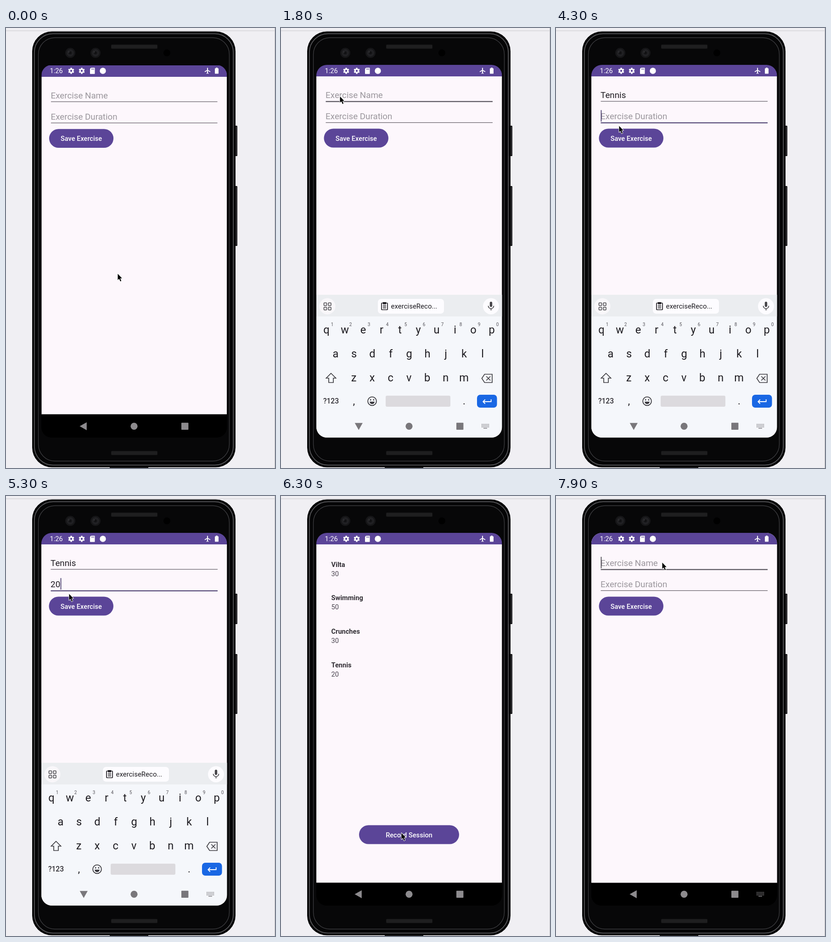
An HTML page with a canvas for the animation above (8 s loop, 586x955 px).

```html
<!DOCTYPE html>
<html lang="en">
<head>
<meta charset="utf-8">
<title>Exercise form</title>
<style>
html, body { margin: 0; width: 100%; height: 100%; overflow: hidden; background: #f0eff3; }
canvas { display: block; width: 586px; height: 955px; }
</style>
</head>
<body>
<canvas id="stage"></canvas>
<script>
const W = 586, H = 955, LOOP = 8000, STEP = 100;
const canvas = document.getElementById('stage');
const dpr = window.devicePixelRatio || 1;
canvas.width = W * dpr;
canvas.height = H * dpr;
const c = canvas.getContext('2d');

const PURPLE = '#5b4598', PAGE = '#fdf7fc', INK = '#1d1b20', KEYS = '#f5f7fb', ICON = '#3c3b40';
const LEFT = 77, RIGHT = 481.5, TOP = 80, BOTTOM = 889, PAGE_END = 839.5;
const WIDE = RIGHT - LEFT, MID = (LEFT + RIGHT) / 2, CENTER = (TOP + BOTTOM) / 2;

const NAME = { word: 'Tennis', start: 2270, gap: 230 };
const MINUTES = { word: '20', start: 4900, gap: 200 };
const SESSIONS = [['Vilta', 30], ['Swimming', 50], ['Crunches', 30], ['Tennis', 20]];

// Moments of the story
const FOCUS_NAME = 1100, FOCUS_MINUTES = 4300, SAVED = 5700, REOPENED = 6800, REFOCUS = 7700;

const START = { x: 243, y: 533 };
const MOVES = [
  { from: 400, to: 1000, x: 128, y: 148 },
  { from: 3600, to: 4200, x: 137, y: 212 },
  { from: 5300, to: 5500, x: 150, y: 238 },
  { from: 5700, to: 6200, x: 262, y: 731 },
  { from: 7000, to: 7500, x: 231, y: 144 }
];

const clamp = v => Math.max(0, Math.min(1, v));
const ease = v => v * v * (3 - 2 * v);
const ramp = (t, a, b) => ease(clamp((t - a) / (b - a)));

// ---- drawing helpers ----
function paint(fill, stroke, line) {
  if (fill) { c.fillStyle = fill; c.fill(); }
  if (stroke) { c.strokeStyle = stroke; c.lineWidth = line; c.stroke(); }
}
function rect(x, y, w, h, fill) {
  c.fillStyle = fill;
  c.fillRect(x, y, w, h);
}
function round(x, y, w, h, r, fill, stroke, line = 1) {
  c.beginPath();
  c.roundRect(x, y, w, h, r);
  paint(fill, stroke, line);
}
function disc(x, y, r, fill, stroke, line = 1) {
  c.beginPath();
  c.arc(x, y, r, 0, Math.PI * 2);
  paint(fill, stroke, line);
}
function bowl(x, y, r, fill, stroke, line) {
  c.beginPath();
  c.arc(x, y, r, 0, Math.PI);
  paint(fill, stroke, line);
}
function poly(points, fill, stroke, line) {
  c.beginPath();
  points.forEach(([x, y]) => c.lineTo(x, y));
  c.closePath();
  paint(fill, stroke, line);
}
function path(points, stroke, line) {
  c.beginPath();
  points.forEach(([x, y]) => c.lineTo(x, y));
  paint(null, stroke, line);
}
function text(s, x, y, size, fill, weight = 400, align = 'left') {
  c.font = `${weight} ${size}px Roboto, sans-serif`;
  c.textAlign = align;
  c.fillStyle = fill;
  c.fillText(s, x, y);
}
function at(x, y, draw) {
  c.save();
  c.translate(x, y);
  draw();
  c.restore();
}
function zoomed(scale, alpha, draw) {
  at(MID, CENTER, () => {
    c.globalAlpha = alpha;
    c.scale(scale, scale);
    c.translate(-MID, -CENTER);
    draw();
  });
}

// ---- phone ----
function shell(inset, fill, stroke, line) {
  round(57 + inset, 7.5 + inset, 443 - 2 * inset, 946 - 2 * inset, 43 - inset / 2, fill, stroke, line);
}
function speaker(y) {
  round(229, y, 101, 9, 2, '#1b1b1c');
  for (let x = 231; x < 329; x += 3) rect(x, y + 2, 1, 5, '#262627');
}
function lens(x) {
  disc(x, 54, 11, '#161618');
  disc(x, 54, 7, '#1f1f22', '#29292b');
  disc(x, 54, 3, '#111113');
  disc(x - 3, 52, 1, '#48484b');
}
function sideButton(y, h) {
  round(498, y, 6, h, 1.5, '#131314');
  rect(501.5, y + 2, 1, h - 4, '#58565a');
}
function phone() {
  rect(0, 0, W, H, '#f0eff3');
  rect(0, 5.5, W, 1, '#c9c8cc');
  rect(585, 0, 1, H, '#c4c3c7');
  sideButton(212, 66);
  sideButton(343, 130);
  shell(0, '#050506');
  rect(226, 953, 84, 2, '#161617');
  shell(4.8, null, '#58585b', 1.8);
  shell(13.5, '#070708', '#3b3b3e', 1.4);
  lens(140);
  lens(195);
  disc(350.5, 54, 7.5, '#000');
  speaker(36);
  speaker(918);
}

// ---- status and navigation bars ----
function gear(x, y) {
  at(x, y, () => {
    for (let i = 0; i < 3; i++) {
      rect(-1.7, -6.6, 3.4, 13.2, '#fff');
      c.rotate(Math.PI / 3);
    }
    disc(0, 0, 4.9, '#fff');
    disc(0, 0, 2.2, PURPLE);
  });
}
function plane(x, y) {
  at(x, y, () => {
    path([[0, -6.5], [0, 5]], '#fff', 2);
    path([[-6, 2], [0, -1.5], [6, 2]], '#fff', 1.8);
    path([[-2.3, 6], [0, 4.6], [2.3, 6]], '#fff', 1.4);
  });
}
function statusIcons() {
  text('1:26', 95.5, 98.3, 14.6, '#fff');
  gear(142, 93);
  gear(165, 93);
  round(183, 86.3, 10.5, 13.4, [4, 1, 1, 1], '#fff');
  for (let i = 0; i < 3; i++) rect(186.2 + i * 2.2, 88, 1.1, 2.6, PURPLE);
  disc(211, 93, 6.7, '#fff');
  plane(439, 93);
  round(455, 87.5, 8, 11.7, 1, '#fff');
  rect(457.2, 86, 3.6, 2, '#fff');
}
function navIcons(light, keys) {
  const tone = light ? '#79777b' : '#8d8b8e';
  at(169, 864, () => {
    if (light) c.rotate(-Math.PI / 2);
    poly([[-8.5, 0.3], [6.8, -8.3], [6.8, 8.9]], tone);
  });
  disc(279, 864.3, 7.6, tone);
  round(382, 856.8, 15.4, 15.2, 1, tone);
  if (!keys) return;
  for (let i = 0; i < 18; i++) rect(437 + i % 6 * 2.9, 859.5 + Math.floor(i / 6) * 2.8, 1.6, 1.6, tone);
  rect(441, 868, 8, 1.4, tone);
}

// ---- screens ----
function pageBase() {
  rect(LEFT, TOP, WIDE, 25, PURPLE);
  rect(LEFT, 105, WIDE, PAGE_END - 105, PAGE);
  rect(LEFT, PAGE_END, WIDE, BOTTOM - PAGE_END, '#000');
}
function pill(x, y, w, label) {
  round(x, y, w, 41, 20.5, PURPLE);
  text(label, x + w / 2, y + 26.3, 14.6, '#fff', 500, 'center');
}
function field(y, hint, value, focused, caret, accent) {
  text(value || hint, 97.1, y, 18.8, value ? INK : '#9b979d');
  const end = value ? c.measureText(value).width : 0;
  rect(97.5, y + 6.6, 363.5, focused ? 2 : 1.1, focused ? accent : '#514d55');
  if (focused && caret) rect(97.6 + end, y - 20, 1.7, 25, accent);
}
function form({ name, minutes, focus, caret }) {
  pageBase();
  field(152, 'Exercise Name', name, focus === 1, caret, '#49454f');
  field(198.2, 'Exercise Duration', minutes, focus === 2, caret, '#44386a');
  pill(93.5, 218.5, 140.5, 'Save Exercise');
}
function list() {
  pageBase();
  SESSIONS.forEach(([name, minutes], i) => {
    const y = 153.8 + i * 72.6;
    text(name, 109.5, y, 14.6, '#322f35', 700);
    text(minutes, 109.5, y + 20, 14.6, '#49454f');
  });
  pill(170, 714.5, 218, 'Record Session');
}

// ---- keyboard ----
function keyRow(keys, x, y, size = 23.6, tone = INK) {
  [...keys].forEach((k, i) => text(k, x + i * 40, y, size, tone, 400, 'center'));
}
function clipboard(x, y) {
  round(x, y, 13, 14.5, 1, null, INK, 1.7);
  rect(x + 3, y - 2, 7, 4.5, INK);
  for (let i = 0; i < 3; i++) rect(x + 3, y + 4.5 + i * 2.8, 7, 1.3, INK);
}
function microphone(x, y) {
  round(x - 2.7, y - 10, 5.4, 11.5, 2.7, '#47464a');
  bowl(x, y - 1, 6, null, '#47464a', 1.7);
  rect(x - 0.8, y + 5, 1.7, 4, '#47464a');
}
function toolbar() {
  rect(LEFT, 579, WIDE, 47, '#ebedf0');
  disc(101, 604, 17.5, '#f9f7fa');
  for (let i = 0; i < 4; i++)
    round(93.5 + i % 2 * 9.5, 596.5 + (i >> 1) * 9.5, 6, 6, 1, null, '#47464a', 1.5);
  round(211, 588, 144, 32, 7, '#fdfcff');
  clipboard(219, 597);
  text('exerciseReco...', 239.5, 609, 15, INK);
  disc(457.5, 604, 17.5, '#fdfcff');
  microphone(457.5, 604);
}
function shiftKey() {
  poly([[0, -10.5], [10.5, 0], [5, 0], [5, 9.5], [-5, 9.5], [-5, 0], [-10.5, 0]], null, ICON, 1.7);
}
function deleteKey() {
  poly([[-11.5, 0], [-5.5, -9], [11, -9], [11, 9], [-5.5, 9]], null, ICON, 1.7);
  for (const d of [-4.5, 4.5]) path([[2.7 - d, -4.5], [2.7 + d, 4.5]], ICON, 1.7);
}
function smileKey() {
  disc(0, 0, 9.4, null, ICON, 1.8);
  for (const d of [-3.3, 3.3]) disc(d, -3, 1.5, ICON);
  bowl(0, 1, 5.3, ICON);
}
function enterKey() {
  round(-21.7, -14, 43.5, 28, 7, '#1967e4');
  path([[9, -4], [9, 1], [-8, 1]], '#fff', 1.8);
  path([[-4, -3.5], [-8.5, 1], [-4, 5.5]], '#fff', 1.8);
}
function keyboard() {
  rect(LEFT, 579, WIDE, 310, KEYS);
  toolbar();
  keyRow('qwertyuiop', 99, 663);
  keyRow('1234567890', 111.5, 646.5, 10, '#55535a');
  keyRow('asdfghjkl', 119, 714.5);
  keyRow('zxcvbnm', 158.7, 766.5);
  text('?123', 109, 815.3, 15.6, '#302e34', 500, 'center');
  text(',', 159, 817, 22, INK, 400, 'center');
  text('.', 399, 817, 22, INK, 400, 'center');
  round(228, 798, 141, 24, 3, '#dcdade');
  at(109, 760, shiftKey);
  at(449, 760.5, deleteKey);
  at(198.5, 810, smileKey);
  at(448.7, 810, enterKey);
}

function pointer({ x, y }) {
  at(x, y, () => {
    c.scale(0.93, 0.93);
    c.lineJoin = 'round';
    poly([[0.5, 0.5], [0.5, 15], [3.8, 12], [6.5, 18.2], [8.8, 17.2], [6.2, 11.2], [10.5, 11]], null, '#fff', 2);
    c.fillStyle = '#000';
    c.fill();
  });
}

// ---- timeline ----
function pointerAt(t) {
  return MOVES.reduce((p, m) => {
    const k = ramp(t, m.from, m.to);
    return { x: p.x + (m.x - p.x) * k, y: p.y + (m.y - p.y) * k };
  }, START);
}
function typing({ word, start, gap }, t) {
  const count = Math.max(0, Math.min(word.length, Math.floor((t - start) / gap) + 1));
  return { value: word.slice(0, count), last: count ? start + (count - 1) * gap : 0 };
}
function formState(t) {
  if (t >= SAVED) {
    const active = t >= REFOCUS;
    return { name: '', minutes: '', focus: active ? 1 : 0, caret: active };
  }
  const name = typing(NAME, t), minutes = typing(MINUTES, t);
  const focus = t >= FOCUS_MINUTES ? 2 : t >= FOCUS_NAME ? 1 : 0;
  const since = focus === 2 ? Math.max(FOCUS_MINUTES, minutes.last) : Math.max(FOCUS_NAME, name.last);
  return { name: name.value, minutes: minutes.value, focus, caret: (t - since) % 1000 < 500 };
}
function settle(size, age, tau) {
  const rest = size * Math.exp(-age / tau);
  return rest < 0.0006 ? 0 : rest;
}
function editing(t) {
  zoomed(1 - settle(0.0025, t, 100), 1, () => form(formState(t)));
}
function listing(t) {
  const age = t - SAVED;
  zoomed(1 + settle(0.06, age, 110), 1, list);
  if (age < 100) zoomed(0.96, 0.5, () => form(formState(SAVED - STEP)));
}
function reopening(t) {
  const age = t - REOPENED, shrink = settle(0.1, age, 90), k = clamp(shrink / 0.033);
  list();
  rect(LEFT, TOP + 10.5 * k, WIDE, 760 + 2.5 * k, '#efecf1');
  zoomed(1 - shrink, age < 100 ? 0.6 : 1, () => form(formState(t)));
  rect(LEFT, 853, WIDE, BOTTOM - 853, '#000');
}
function render(t) {
  c.setTransform(dpr, 0, 0, dpr, 0, 0);
  phone();
  c.save();
  c.beginPath();
  c.roundRect(LEFT, TOP, WIDE, BOTTOM - TOP, 23);
  c.clip();
  rect(LEFT, TOP, WIDE, BOTTOM - TOP, '#000');
  (t < SAVED ? editing : t < REOPENED ? listing : reopening)(t);
  statusIcons();
  const up = ramp(t, 1200, 1500) - ramp(t, 5500, 5800);
  if (up > 0) {
    rect(LEFT, PAGE_END, WIDE, BOTTOM - PAGE_END, KEYS);
    at(0, 310 * (1 - up), keyboard);
  }
  navIcons(up > 0, (t >= 1200 && t < SAVED) || t >= REFOCUS + 200);
  c.restore();
  pointer(pointerAt(t));
}

// The screen refreshes ten times a second.
function tick(now) {
  render(Math.floor(now % LOOP / STEP) * STEP);
  requestAnimationFrame(tick);
}
requestAnimationFrame(tick);
</script>
</body>
</html>
```
